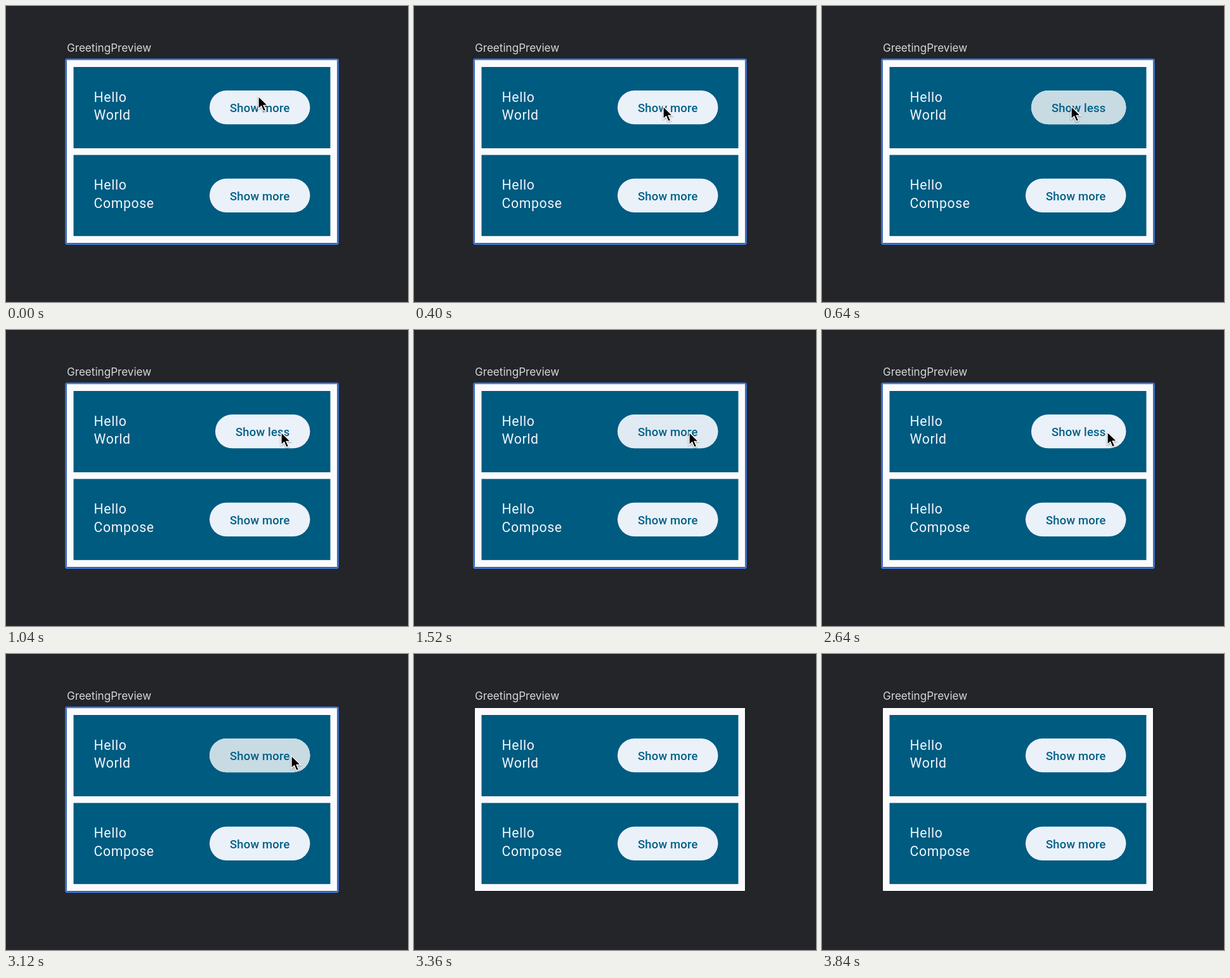
Recreate the animation shown at these times as an HTML page. Size 634 by 466 pixels, loop 3920 ms.

```html
<!DOCTYPE html>
<html lang="en">
<head>
<meta charset="utf-8">
<title>Greeting preview</title>
<style>
  html, body { margin: 0; width: 100%; height: 100%; overflow: hidden; background: #242529; }
  svg { display: block; width: 634px; height: 466px; }
  .title { font: 17.1px Inter, sans-serif; fill: #d6d7d9; }
  .hello { font: 21.2px Roboto, sans-serif; letter-spacing: .66px; fill: #f0f7fb; }
  .label { font: 500 18.55px Roboto, sans-serif; letter-spacing: .13px; fill: #00618a; }
  #cursor path { filter: drop-shadow(0 1px 1px #0006); }
</style>
</head>
<body>
<svg viewBox="0 0 634 466">
  <defs>
    <clipPath id="pill"><rect class="button" x="321" y="133" width="158.5" height="53.3" rx="26.65"/></clipPath>
  </defs>
  <rect width="634" height="466" fill="#242529"/>
  <rect width="634" height="1" fill="#1d1e22"/>
  <rect y="464.5" width="634" height="1.5" fill="#30242b"/>
  <text class="title" x="96" y="72">GreetingPreview</text>

  <rect x="95.5" y="84.5" width="427" height="289" fill="#fbfbfd" stroke="#17181b"/>
  <rect id="border" x="94.5" y="84" width="429" height="290.7" rx="2" fill="none" stroke="#3f78de" stroke-width="2.6"/>

  <g fill="#005b81">
    <rect x="106.5" y="96" width="405" height="128"/>
    <rect x="106.5" y="234.5" width="405" height="127.7"/>
  </g>
  <g class="hello">
    <text x="138.5" y="150.5">Hello</text>
    <text x="138.5" y="179.3">World</text>
    <text x="138.5" y="289.3">Hello</text>
    <text x="138.5" y="318">Compose</text>
  </g>

  <g fill="#ebf1f8">
    <rect class="button" x="321" y="133" width="158.5" height="53.3" rx="26.65"/>
    <rect x="321" y="271.7" width="158.5" height="53.3" rx="26.65"/>
  </g>
  <g clip-path="url(#pill)"><circle id="ripple" fill="#c8dbe3"/></g>
  <text class="label" id="label" x="353" y="166.7">Show more</text>
  <text class="label" x="353" y="305.6">Show more</text>

  <g id="cursor">
    <circle id="press" r="34" fill="#289fa7" fill-opacity=".15"/>
    <path d="M0 0V20l4.6-4.3 3.5 8 3.7-1.6-3.5-7.7h6.5z" stroke="#fff" stroke-width="1.4"/>
  </g>
</svg>
<script>
const LOOP = 3920, STEP = 80, LEAVE = 3280;
const clicks = [500, 1195, 2080, 2920];
// time, x, y of the pointer tip
const path = [[0, 398, 142], [400, 393, 158], [720, 393, 158], [1040, 434, 161],
  [1600, 434, 161], [1920, 450, 161], [LEAVE, 450, 160]];

const $ = id => document.getElementById(id);
const buttons = document.querySelectorAll('.button');
const clamp = v => Math.min(1, Math.max(0, v));
const smooth = v => v * v * (3 - 2 * v);
const mix = (a, b, k) => a + (b - a) * k;
const set = (el, attrs) => { for (const k in attrs) el.setAttribute(k, attrs[k]); };

function pointer(t) {
  const i = Math.max(1, path.findIndex(p => p[0] >= t));
  const [a, b] = [path[i - 1], path[i]];
  const k = smooth(clamp((t - a[0]) / (b[0] - a[0])));
  return [mix(a[1], b[1], k), mix(a[2], b[2], k)];
}

function draw(t) {
  const inside = t < LEAVE;
  const done = clicks.filter(c => c <= t);
  const less = done.length % 2 === 1;
  const left = less ? 330 : 321;

  buttons.forEach(b => set(b, { x: left, width: 479.5 - left }));
  $('label').textContent = less ? 'Show less' : 'Show more';
  set($('label'), { x: left + 32 });

  const start = done.at(-1) ?? -LOOP;
  const age = t - start;
  const grow = smooth(clamp(age / 225) ** 0.67);
  const [px, py] = pointer(Math.max(0, start));
  set($('ripple'), {
    cx: mix(px, (left + 479.5) / 2, grow),
    cy: mix(py, 159.7, grow),
    r: mix(45, 97, grow),
    opacity: clamp(age / 75) * clamp(1 - (age - 225) / 150)
  });

  set($('border'), { visibility: inside ? 'visible' : 'hidden' });
  set($('cursor'), { display: inside ? 'inline' : 'none' });
  if (inside) set($('cursor'), { transform: `translate(${pointer(t)})` });
  const pressed = clicks.some(c => t > c - 80 && t < c + 100);
  set($('press'), { display: pressed ? 'inline' : 'none' });
}

const begin = performance.now();
function tick() {
  const t = (performance.now() - begin) % LOOP;
  draw(Math.floor(t / STEP) * STEP);
  requestAnimationFrame(tick);
}
tick();
</script>
</body>
</html>
```
